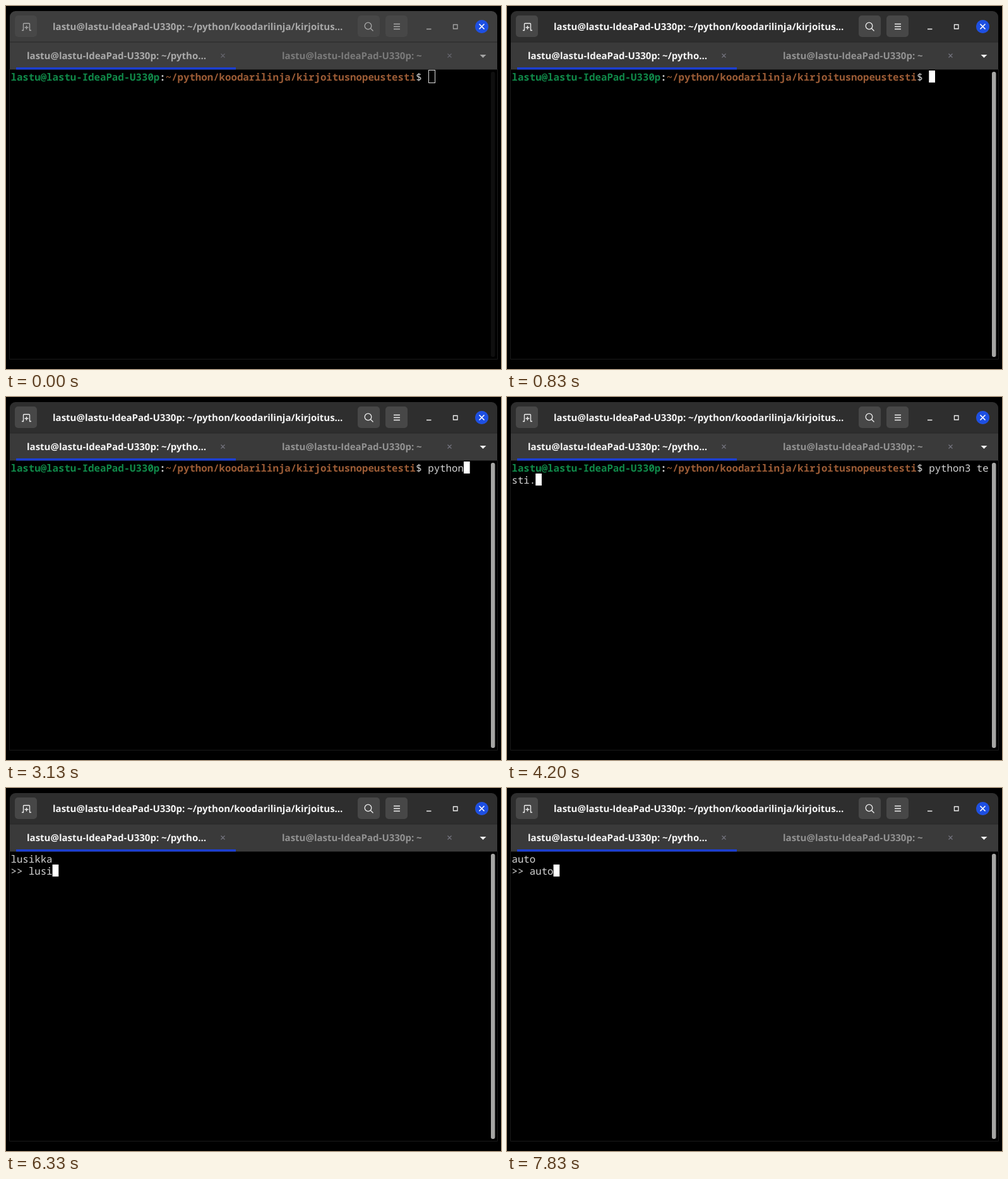
These frames come from a looping animation (784x574 px, 8000 ms). An HTML page:

```html
<!DOCTYPE html>
<html lang="fi">
<head>
<meta charset="utf-8">
<title>Terminal</title>
<style>
html, body { margin: 0; width: 100%; height: 100%; overflow: hidden; background: #000; }
svg { display: block; width: 784px; height: 574px; }
text { white-space: pre; text-rendering: geometricPrecision; }
.ui { font: 700 15px "Open Sans", sans-serif; fill: #f6f6f6; }
.ui.idle { fill: #929292; }
.term { font: 400 15.73px "Noto Sans Mono", monospace; fill: #d6d6d6; }
.bold { font-weight: 700; }
.user { fill: #108a4a; }
.path { fill: #9c5c36; }
.line { fill: none; stroke: #f0f0f0; stroke-width: 1.3; }
.faint { fill: none; stroke: #757580; stroke-width: 1.1; }
</style>
</head>
<body>
<svg viewBox="0 0 784 574">
  <path d="M5.5 100V558.5H778.5V100" fill="none" stroke="#1a1a1a"/>
  <path d="M6 57V17a9 9 0 0 1 9-9H769a9 9 0 0 1 9 9V57Z" id="head"/>
  <path d="M6 57H778V100.5H6Z" id="tabs"/>
  <path d="M6 57H778" stroke="#262626"/>
  <path d="M16 98.7H364" stroke="#1c3fd2" stroke-width="3.4"/>

  <g fill="none" stroke="#2c2c2c">
    <rect x="14.5" y="15.5" width="34" height="33" rx="5"/>
    <rect x="557.5" y="15.5" width="34" height="33" rx="5"/>
    <rect x="601.5" y="15.5" width="34" height="33" rx="5"/>
  </g>
  <g id="buttons" fill="#474747">
    <rect x="14" y="15" width="35" height="34" rx="5"/>
    <rect x="557" y="15" width="35" height="34" rx="5"/>
    <rect x="601" y="15" width="35" height="34" rx="5"/>
  </g>
  <circle cx="753.5" cy="32.5" r="10.5" fill="#555"/>
  <circle cx="753.5" cy="32.5" r="10.5" fill="#1d4fe2" id="close"/>
  <path d="M749.5 28.5l8 8m0-8l-8 8" stroke="#fff" stroke-width="1.7"/>

  <g class="bright">
    <path class="line" d="M25 38.5H27.5V28.5q0-1 1-1H36.5q1 0 1 1V38.5H40M32.5 31v6M29.5 34h6"/>
    <circle class="line" cx="573.5" cy="31.5" r="5.3"/>
    <path class="line" d="M577.5 35.5l4 4M614 28.5h10M614 32.5h10M614 36.5h10M666 36.5h7.5M708.5 29.5h6.5v6.5h-6.5z"/>
    <text class="ui" x="74" y="37.5">lastu@lastu-IdeaPad-U330p: ~/python/koodarilinja/kirjoitus…</text>
    <text class="ui" x="33" y="84">lastu@lastu-IdeaPad-U330p: ~/pytho…</text>
    <path d="M750.5 77h10l-5 5z" fill="#f0f0f0"/>
  </g>
  <g class="bright">
    <text class="ui idle" x="437" y="84">lastu@lastu-IdeaPad-U330p: ~</text>
    <path class="faint" d="M340.5 75.5l6 6m0-6l-6 6M699.5 75.5l6 6m0-6l-6 6"/>
  </g>

  <g id="prompt">
    <text class="term bold" x="7.5" y="117.5"><tspan class="user">lastu@lastu-IdeaPad-U330p</tspan>:<tspan class="path">~/python/koodarilinja/kirjoitusnopeustesti</tspan></text>
    <text class="term" x="649.3" y="117.5">$</text>
  </g>
  <text class="term" id="row0" y="117.5"></text>
  <text class="term" id="row1" x="7.5" y="136.5"></text>
  <rect id="cursor"/>
  <rect id="scroll" x="768" y="104" width="6.5" height="451" rx="3.2" fill="#a6a6a4"/>
</svg>
<script>
const LOOP = 8000, CELL = 9.44, ROW = 19, LEFT = 7.5, COLS = 80, PROMPT = 70;
const BLUR = 30, FOCUS = 620, FADE = 200, ENTER = 4430;
// each typed text with the time of every key
const command = {
  word: 'python3 testi.py',
  keys: [1600, 1700, 1870, 2010, 2150, 2290, 3330, 3530, 3630, 3730, 3830, 3930, 4030, 4130, 4230, 4330]
};
const rounds = [
  { word: 'lusikka', start: 4560, keys: [5640, 5870, 6000, 6170, 6400, 6550, 6700] },
  { word: 'auto', start: 6880, keys: [7280, 7480, 7700, 7830] }
];

const el = id => document.getElementById(id);
const head = el('head'), tabs = el('tabs'), buttons = el('buttons'), closeDot = el('close');
const prompt = el('prompt'), row0 = el('row0'), row1 = el('row1');
const cursor = el('cursor'), scroll = el('scroll');
const [mainParts, idleParts] = document.querySelectorAll('.bright');

const ramp = (t, from) => {
  const p = Math.min(1, Math.max(0, (t - from) / FADE));
  return p * p * (3 - 2 * p);
};
const lerp = (a, b, p) => a + (b - a) * p;
const grey = v => `rgb(${v},${v},${v})`;
const typed = ({ word, keys }, t) => word.slice(0, keys.filter(k => k <= t).length);
const set = (node, attrs) => Object.entries(attrs).forEach(([k, v]) => node.setAttribute(k, v));

function drawCursor(col, row, filled) {
  const x = LEFT + col * CELL, y = 102 + row * ROW;
  set(cursor, filled
    ? { x, y, width: 9.7, height: 19, fill: '#fff', stroke: 'none' }
    : { x: x + 1.2, y: y - 0.5, width: 10, height: 20, fill: 'none', stroke: '#dcdcdc' });
}

function drawChrome(t) {
  const focus = ramp(t, FOCUS);
  const active = Math.max(1 - ramp(t, BLUR), focus);
  head.setAttribute('fill', grey(lerp(62, 46, focus)));
  tabs.setAttribute('fill', grey(lerp(62, 58, focus)));
  buttons.style.opacity = closeDot.style.opacity = active;
  mainParts.style.opacity = lerp(0.58, 1, focus);
  idleParts.style.opacity = lerp(0.72, 1, focus);
  scroll.style.opacity = lerp(0.09, 1, focus);
}

function drawShell(t) {
  const line = typed(command, t);
  const room = COLS - PROMPT;
  prompt.style.display = '';
  row0.setAttribute('x', LEFT + PROMPT * CELL);
  row0.textContent = line.slice(0, room);
  row1.textContent = line.slice(room);
  const at = PROMPT + line.length;
  if (t >= ENTER) drawCursor(0, 2, true);
  else drawCursor(at % COLS, Math.floor(at / COLS), t >= FOCUS);
}

function drawTest(t) {
  const round = rounds.filter(r => r.start <= t).pop();
  const line = '>> ' + typed(round, t);
  prompt.style.display = 'none';
  row0.setAttribute('x', LEFT);
  row0.textContent = round.word;
  row1.textContent = line;
  drawCursor(line.length, 1, true);
}

function draw(t) {
  drawChrome(t);
  (t < rounds[0].start ? drawShell : drawTest)(t);
}

const begin = performance.now();
function tick(now) {
  draw(Math.max(0, now - begin) % LOOP);
  requestAnimationFrame(tick);
}
draw(0);
requestAnimationFrame(tick);
</script>
</body>
</html>
```
